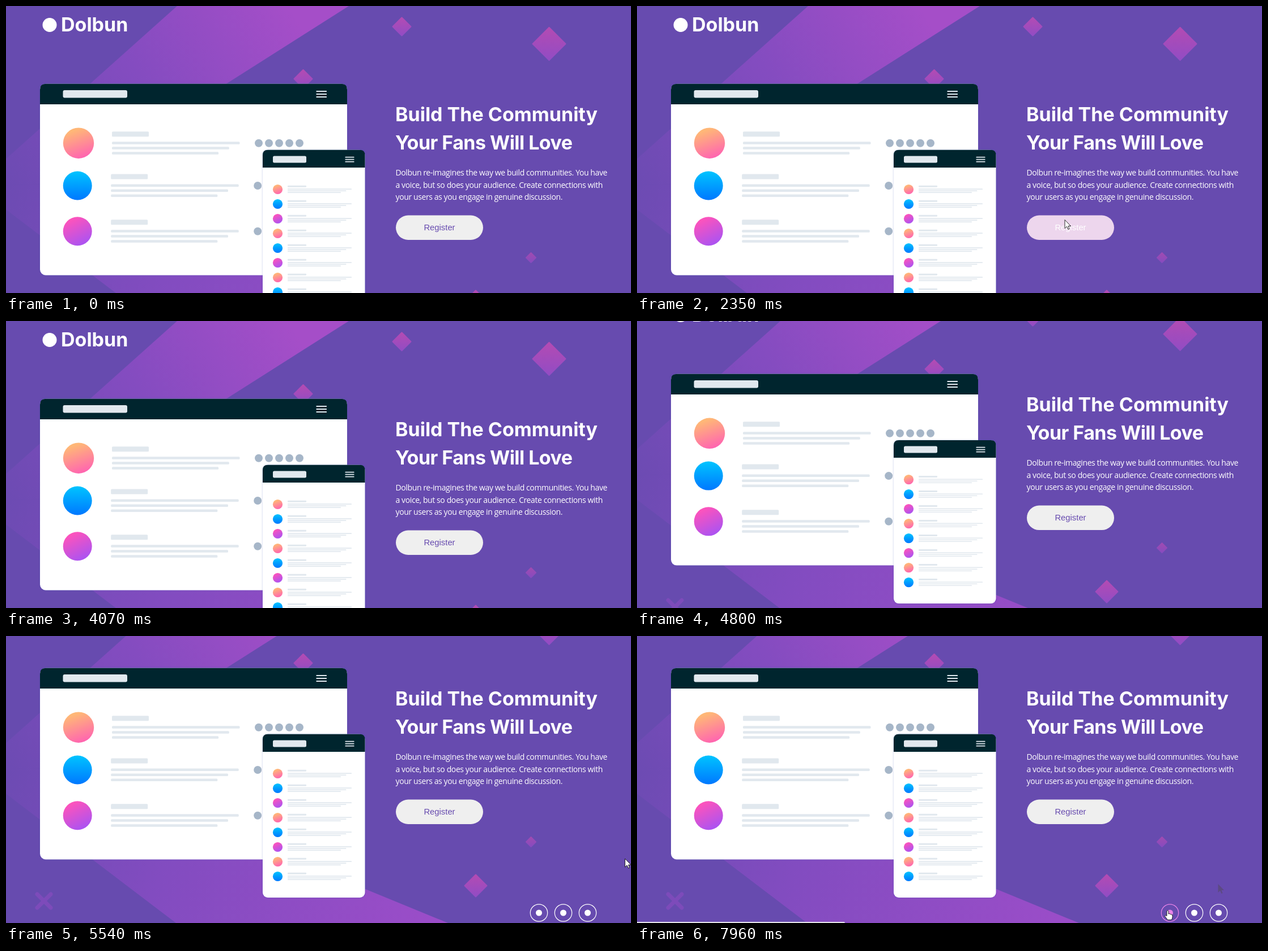
Animation of 1103 by 508 pixels, one loop 8 s. Source, as an HTML page:

```html
<!DOCTYPE html>
<html lang="en">
<head>
<meta charset="utf-8">
<title>Community landing page</title>
<style>
  html, body { margin: 0; width: 100%; height: 100%; overflow: hidden; background: #674baf; }
  svg { display: block; }
  text { fill: #fff; }
  .brand { font: 700 34px Inter, sans-serif; }
  .head { font: 700 34px Inter, sans-serif; }
  .tight { letter-spacing: -.55px; }
  .copy { font: 14px "Open Sans", sans-serif; letter-spacing: -.4px; }
  .label { font: 14.8px "Liberation Sans", Arial, sans-serif; text-anchor: middle; }
  .card { filter: drop-shadow(0 0 1.5px rgba(60, 85, 180, .35)); }
</style>
</head>
<body>
<svg width="1103" height="508" viewBox="0 0 1103 508">
  <defs>
    <linearGradient id="upper" gradientUnits="userSpaceOnUse" x1="0" y1="300" x2="500" y2="0">
      <stop stop-color="#6d4bb3"/><stop offset=".5" stop-color="#844cc0"/><stop offset="1" stop-color="#a54ec8"/>
    </linearGradient>
    <linearGradient id="lower" gradientUnits="userSpaceOnUse" x1="0" y1="330" x2="740" y2="589">
      <stop stop-color="#6d4bb3"/><stop offset=".4" stop-color="#824cc0"/><stop offset="1" stop-color="#9a4dc8"/>
    </linearGradient>
    <linearGradient id="gem" x2="0" y2="1"><stop stop-color="#b34bb3"/><stop offset="1" stop-color="#924cc4"/></linearGradient>
    <linearGradient id="orange" x1=".3" x2=".65" y2="1"><stop offset=".1" stop-color="#ffb777"/><stop offset="1" stop-color="#ff62b2"/></linearGradient>
    <linearGradient id="blue" x2="0" y2="1"><stop stop-color="#00c4ff"/><stop offset="1" stop-color="#0078ff"/></linearGradient>
    <linearGradient id="magenta" x1=".25" x2=".75" y2="1"><stop offset=".1" stop-color="#fb53bd"/><stop offset="1" stop-color="#a653f5"/></linearGradient>
    <path id="arrow" d="M0 0V15L3.5 11.7 6 17 8 16 6 11H10.5Z"/>
  </defs>
  <rect width="1103" height="508" fill="#674baf"/>
  <g id="page"></g>
  <use id="trail" href="#arrow" x="1025.5" y="439" fill="#5c4a83"/>
  <path id="status" d="M0 506H365Q367 506 367 508H0Z" fill="#e4e2e8"/>
  <g id="pointer" fill="#fff" stroke="#111" stroke-width=".9" stroke-linejoin="round">
    <use id="plain" href="#arrow"/>
    <path id="hand" d="M-1.5 10V1.5Q0-1 1.5 1.5V6.5Q4 5 4.5 7 6.5 6 7 8 8.5 7.5 8.5 9.5V12Q8.5 15 6.5 17H0Q-2 14-5 10.5-4.5 8-1.5 10Z"/>
  </g>
</svg>
<script>
const $ = id => document.getElementById(id);
const PALE = '#e1e8ee', DARK = '#00252e';
const WHITE = [255, 255, 255], PINK = [232, 130, 232], GREY = [239, 239, 239];
const FILLS = ['orange', 'blue', 'magenta'];
const ICONS = ['icon0', 'icon1', 'icon2'];

const repeat = (n, make) => Array.from({ length: n }, (_, i) => make(i)).join('');
const rect = (x, y, w, h, fill, r = 0) =>
  `<rect x="${x}" y="${y}" width="${w}" height="${h}" rx="${r}" fill="${fill}"/>`;
const disc = (x, y, r, fill) => `<circle cx="${x}" cy="${y}" r="${r}" fill="${fill}"/>`;
const avatar = (x, y, r, i) => disc(x, y, r, `url(#${FILLS[i % 3]})`);
const poly = (points, fill) => `<polygon points="${points}" fill="url(#${fill})"/>`;
const text = (x, y, cls, str) => `<text x="${x}" y="${y}" class="${cls}">${str}</text>`;
const menu = (x, y, w, gap, h) => repeat(3, i => rect(x, y + i * gap, w, h, PALE, .5));

function gem(x, y, r) {
  const s = r - 1;
  return `<path d="M${x} ${y - s}l${s} ${s} ${-s} ${s} ${-s} ${-s}z" fill="url(#gem)" stroke="url(#gem)"
    stroke-width="2" stroke-linejoin="round" opacity="${r < 10 ? .75 : 1}"/>`;
}

// A white window with a dark title bar
const panel = (x, y, w, h, bar, r) => `<g class="card">${rect(x, y, w, h, '#fff', r)}
  <path d="M${x} ${y + bar}v${r - bar}q0 ${-r} ${r} ${-r}h${w - 2 * r}q${r} 0 ${r} ${r}v${bar - r}z" fill="${DARK}"/></g>`;

const desktop = () =>
  panel(60, 137.7, 542, 338.8, 36.3, 10) + rect(100.5, 149, 113.5, 13.5, PALE, 3) + menu(547.5, 150, 18.5, 5, 2) +
  repeat(3, i => {
    const y = 242 + 78 * i, left = i ? -1.8 : 0, mid = y + (i == 1 ? -2 : .7);
    return avatar(128 + left, mid, i ? 25.5 : 27.2, i) +
      rect(187 + left, mid - 20.5, 65, 9, PALE, 1.5) +
      repeat(3, j => rect(187 + left, mid - 2.5 + 9 * j, 225.5 - 18.7 * j, 4.5, PALE, 1.5)) +
      repeat(5, j => disc(446 + left + 18 * j, mid, 7, '#a6b6c8'));
  });

const phone = () =>
  panel(453, 254.8, 180.5, 289.2, 31.2, 9) + rect(471, 265.5, 59, 12, PALE, 2.5) + menu(598.5, 266.7, 16, 4, 1.7) +
  repeat(8, i => {
    const y = 324.5 + 26 * i;
    return avatar(479.5, y, 8.6, i) + rect(497, y - 6.7, 33, 3, PALE, 1) +
      repeat(3, j => rect(497, y - 1.2 + 3 * j, 113 - 9.5 * j, 1.6, PALE, .6));
  });

const icon = i => `<g id="${ICONS[i]}" transform="translate(${940.5 + 43 * i} 571)">
  <circle r="15.2" fill="none" stroke="currentColor" stroke-width="1.2"/>${disc(0, 0, 5.5, 'currentColor')}</g>`;

$('page').innerHTML =
  poly('302,0 605,0 112,314 -54,319', 'upper') +
  poly('-54,319 112,314 780,589 300,589', 'lower') +
  gem(698.5, 36.5, 17) + gem(958.5, 67, 30) + gem(524.5, 129, 17) + gem(926.5, 445.5, 9.5) + gem(829, 523, 20.5) +
  '<path d="M55 538l24 24m0-24l-24 24" stroke="#7d4bba" stroke-width="7" stroke-linecap="round"/>' +
  desktop() + phone() +
  disc(77, 33.5, 12.5, '#fff') + text(97, 45, 'brand', 'Dolbun') +
  text(687, 204, 'head', 'Build The Community') +
  text(687, 253.5, 'head tight', 'Your Fans Will Love') +
  text(687.5, 300, 'copy', 'Dolbun re-imagines the way we build communities. You have') +
  text(687.5, 321.5, 'copy', 'a voice, but so does your audience. Create connections with') +
  text(687.5, 343, 'copy', 'your users as you engage in genuine discussion.') +
  '<rect id="button" x="688" y="370.5" width="154" height="43.5" rx="21.7"/>' +
  text(765, 396.7, 'label', '<tspan id="label">Register</tspan>') +
  repeat(3, icon);

// Pointer paths as [time, x, y]
const TO_BUTTON = [[1120, 1082, 500], [1260, 861, 419], [1520, 861, 419], [1670, 752, 326], [1850, 752, 326],
  [2350, 755, 378.5], [2680, 762, 388], [3800, 1095, 251], [4070, 1095, 251]];
const TO_ICONS = [[5540, 1092.5, 394], [6200, 1026, 440], [6300, 1025, 487], [6880, 1022, 489],
  [6990, 1003.5, 490], [7400, 980, 489], [7960, 936.5, 485.5], [8000, 936.5, 485.5]];
const HOVER = { button: [2165, 2830], icon2: [6250, 6960], icon1: [7060, 7500], icon0: [7640, 9000] };

function locate(path, t) {
  const i = path.findIndex(p => p[0] > t);
  if (i < 1) return null;
  const [t0, x0, y0] = path[i - 1], [t1, x1, y1] = path[i], k = (t - t0) / (t1 - t0);
  return `translate(${x0 + (x1 - x0) * k} ${y0 + (y1 - y0) * k})`;
}
const clamp = x => Math.min(1, Math.max(0, x));
const smooth = x => x * x * (3 - 2 * x);
const fade = (t, [on, off], ms) => smooth(clamp((t - on) / ms)) - smooth(clamp((t - off) / ms));
const over = (t, [on, off]) => t >= on && t < off;
const mix = (a, b, k) => `rgb(${a.map((v, i) => Math.round(v + (b[i] - v) * k))})`;
const show = (id, on) => $(id).style.display = on ? '' : 'none';

function draw(now) {
  const t = now % 8000;
  const scroll = 81 * (1 - (1 - clamp((t - 4730) / 310)) ** 3);
  $('page').setAttribute('transform', `translate(0 ${-scroll})`);

  $('button').setAttribute('fill', mix(GREY, PINK, fade(t, HOVER.button, 600)));
  $('label').style.fill = over(t, HOVER.button) ? '#fff' : '#674baf';
  ICONS.forEach(id => $(id).style.color = mix(WHITE, PINK, fade(t, HOVER[id], 300)));

  const place = locate(TO_BUTTON, t) || locate(TO_ICONS, t);
  const linked = ICONS.some(id => over(t, HOVER[id]));
  show('pointer', place);
  if (place) $('pointer').setAttribute('transform', place);
  show('hand', linked);
  show('plain', !linked);
  show('trail', t >= 6200);
  show('status', t >= 6400);
  requestAnimationFrame(draw);
}
requestAnimationFrame(draw);
</script>
</body>
</html>
```
